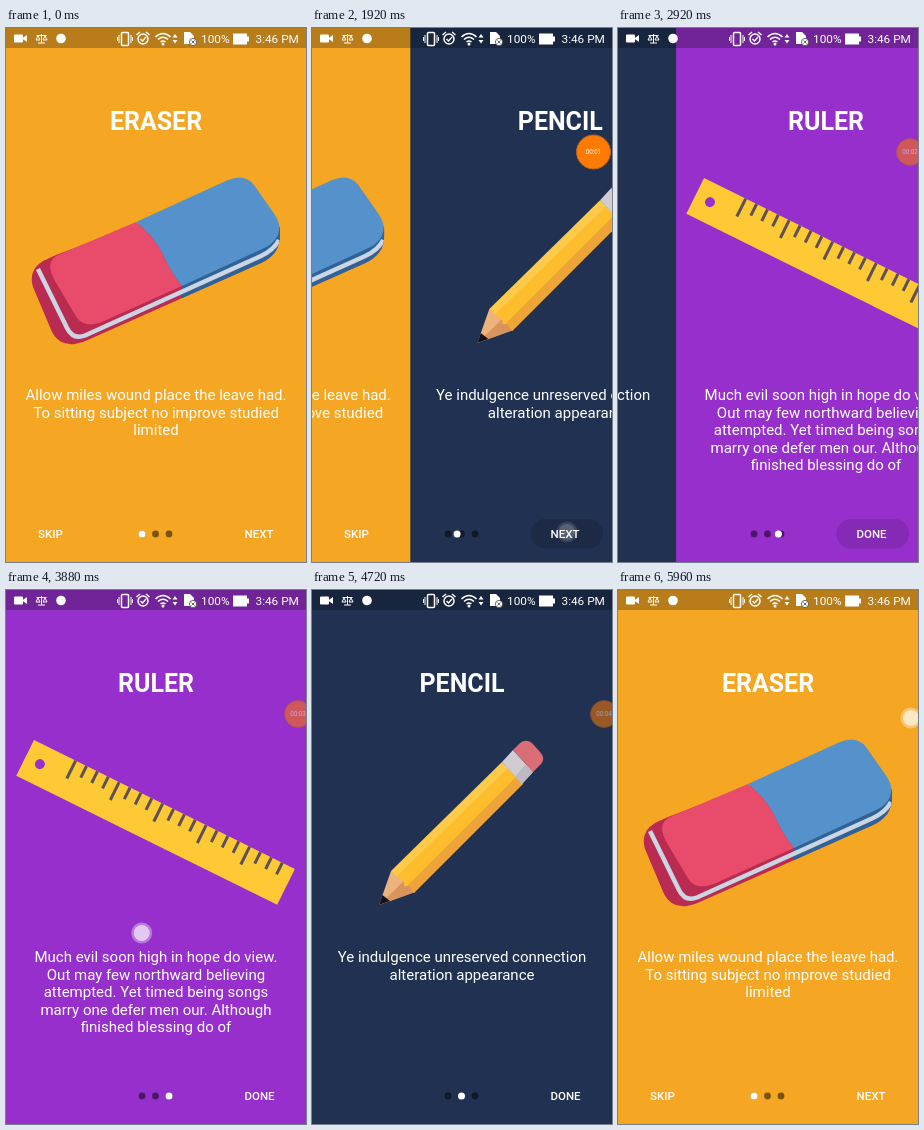
These frames come from a looping animation (300x534 px, 6040 ms). An HTML page:

```html
<!DOCTYPE html>
<html lang="en">
<head>
<meta charset="utf-8">
<title>Intro slides</title>
<style>
  html, body { margin: 0; width: 100%; height: 100%; overflow: hidden; background: #f5a623; }
  svg { display: block; width: 300px; height: 534px; font-family: Roboto, sans-serif; fill: #fff; }
  .title { font: 700 25px Roboto, sans-serif; text-anchor: middle; }
  .body { font-size: 15px; text-anchor: middle; }
  .btn { font: 500 11.5px Roboto, sans-serif; }
  .clock { font-size: 11.8px; }
  .line { fill: none; stroke: #fff; }
</style>
</head>
<body>
<svg viewBox="0 0 300 534">
  <defs>
    <clipPath id="shell">
      <path d="M50 227L37 233Q22 242 27 259L46 304Q53 318 69 316Q76 315 84 311L255 235Q274 226 274 208V200L240 155Z"/>
    </clipPath>
  </defs>

  <g class="page">
    <rect width="301" height="534" fill="#f5a623"/>
    <g clip-path="url(#shell)">
      <rect x="20" y="140" width="260" height="180" fill="#b92b50"/>
      <path d="M174 140H280V320H176V258Z" fill="#2f6296"/>
      <path d="M32 241L61 300Q67 312 79 307.500L255 228Q268 222 273 212" fill="none" stroke="#cbd5e4" stroke-width="4.500"/>
    </g>
    <path d="M52 227L130 194C142 204 152 215 158 229Q166 246 176 258L98 293Q80 301 71 290L49 253Q38 234 52 227Z" fill="#e94b6b"/>
    <path d="M130 194L222 152Q239 145 248 157L269 187Q279 203 266 215Q263 218 256 221L176 258Q166 246 158 229C152 215 142 204 130 194Z" fill="#5591cb"/>
  </g>

  <g class="page">
    <rect width="301" height="534" fill="#203152"/>
    <path d="M67 315L79 281L91 287L103 302Z" fill="#eeb27c"/>
    <path d="M67 315L92 291L103 302Z" fill="#d9935c"/>
    <path d="M67 315L70.500 305L78 311Z" fill="#14141c"/>
    <path d="M79 281L190 172L197 179L88 287L84 286Z" fill="#fdca4a"/>
    <path d="M85 286L196 178L205 188L97 296L92 296L92 292Z" fill="#fdbd2d"/>
    <path d="M96 295L204 187L211 194L102 303Z" fill="#efa536"/>
    <path d="M190 172L201 160L221 182L210 194Z" fill="#d0ccd2"/>
    <path d="M203 187L214 174L221 182L210 194Z" fill="#bdb9c2"/>
    <path d="M201 160L207 154Q213 148 220 153L228 162Q234 168 229 174L221 182Z" fill="#da6e77"/>
  </g>

  <g class="page">
    <rect width="301" height="534" fill="#962fcb"/>
    <g transform="translate(28 150) rotate(26.300)">
      <rect width="291" height="40" fill="#fdc934"/>
      <circle cx="16" cy="19" r="5" fill="#962fcb"/>
      <path id="ticks" fill="none" stroke="#5f5057" stroke-width="3"/>
    </g>
  </g>

  <rect width="300" height="20" fill="#000" fill-opacity=".25"/>
  <g id="status">
    <rect x="8" y="6.500" width="9" height="8" rx="1"/>
    <path d="M16 10.500L21 7V14Z"/>
    <path class="line" d="M35.500 6V15M32 15H39M30.500 7.500H40.500M30 12L32 8L34 12ZM37 12L39 8L41 12Z"/>
    <circle cx="55" cy="10.500" r="4.800"/>
    <rect class="line" x="115.500" y="4.500" width="7" height="13" rx="1" stroke-width="1.500"/>
    <path class="line" d="M113 7V15M125 7V15M111.500 9V13M126.500 9V13"/>
    <circle class="line" cx="137" cy="11" r="5" stroke-width="1.500"/>
    <path class="line" d="M130.500 7L134 4M143.500 7L140 4M134.500 11L136.500 13L140 9" stroke-width="1.400"/>
    <path class="line" d="M149.500 9Q157 2 164.500 9M152 11.500Q157 7 162 11.500M154.500 14Q157 12 159.500 14" stroke-width="1.600"/>
    <circle cx="157" cy="16" r="1.500"/>
    <path d="M166.500 9.500L169 6L171.500 9.500ZM166.500 12L169 15.500L171.500 12Z"/>
    <path d="M178 4H184L188 8V16H178Z"/>
    <circle cx="187" cy="14" r="3.600" fill="#fff" stroke="#444" stroke-width=".8"/>
    <path d="M185.500 12.500L188.500 15.500M188.500 12.500L185.500 15.500" stroke="#444" stroke-width=".8"/>
    <text class="clock" x="195" y="15">100%</text>
    <path d="M227 5.500H241V8.500H243V13.500H241V16.500H227Z"/>
    <text class="clock" x="249.500" y="15">3:46 PM</text>
  </g>

  <rect id="ripple" x="218.500" y="491" width="72.500" height="29.500" rx="14.500" fill="#000"/>
  <text id="skip" class="btn" x="32" y="510">SKIP</text>
  <text id="next" class="btn" x="238.500" y="510">NEXT</text>
  <g fill="#000" fill-opacity=".5">
    <circle cx="136" cy="506" r="3.400"/>
    <circle cx="149.500" cy="506" r="3.400"/>
    <circle cx="163" cy="506" r="3.400"/>
  </g>
  <circle id="dot" cy="506" r="3.500"/>

  <g id="bubble">
    <circle id="disc" fill="#ff7a00" stroke="#b8641c" stroke-width="1"/>
    <text id="timer" y="2.300" font-size="6.300" text-anchor="middle"></text>
    <circle id="stop" cx="-8.500" r="3" fill="#e01010"/>
  </g>
  <g id="touch">
    <circle r="10.500" fill-opacity=".35"/>
    <circle r="8" fill-opacity=".6"/>
  </g>
</svg>

<script>
const LOOP = 6040, STEP = 40;
const $ = id => document.getElementById(id);
const pages = [...document.querySelectorAll('.page')];

const copy = [
  ['ERASER', 'Allow miles wound place the leave had.', 'To sitting subject no improve studied', 'limited'],
  ['PENCIL', 'Ye indulgence unreserved connection', 'alteration appearance'],
  ['RULER', 'Much evil soon high in hope do view.', 'Out may few northward believing',
    'attempted. Yet timed being songs', 'marry one defer men our. Although', 'finished blessing do of']
];

function addText(parent, cls, y, str) {
  const el = document.createElementNS('http://www.w3.org/2000/svg', 'text');
  el.setAttribute('class', cls);
  el.setAttribute('x', 150);
  el.setAttribute('y', y);
  el.textContent = str;
  parent.append(el);
}

copy.forEach(([title, ...lines], i) => {
  addText(pages[i], 'title', 102, title);
  lines.forEach((s, n) => addText(pages[i], 'body', 372 + n * 17.6, s));
});

let ticks = '';
for (let i = 0; i < 20; i++) ticks += `M${46.5 + i * 12.13} 0V${i % 4 ? 13 : 20}`;
$('ticks').setAttribute('d', ticks);

const linear = s => s;
const quintOut = s => 1 - (1 - s) ** 5;
const quadIn = s => s * s;

// Each step: [start, end, value at end, easing]
function track(first, steps, t) {
  let v = first;
  for (const [a, b, to, ease = linear] of steps) {
    if (t < a) break;
    v += (to - v) * ease(Math.min(1, (t - a) / (b - a)));
  }
  return v;
}

const scroll = [
  [1880, 2080, 1, quintOut],
  [2864, 3064, 2, quintOut],
  [3900, 4100, 1.62, quadIn],
  [4100, 4600, 1, quintOut],
  [4860, 5100, 0.6, quadIn],
  [5100, 5645, 0, quintOut]
];
const press = [[1600, 1720, .14], [1920, 2280, 0], [2680, 2780, .14], [2880, 3080, 0]];
const bubbleX = [[2160, 2280, 292], [5140, 5320, 303.5], [5400, 5640, 322]];
const bubbleR = [[2160, 2280, 13.5], [5140, 5320, 17]];
const bubbleA = [[2160, 2280, .55]];

// Finger contacts: [from, to, x at from, x at to, y, opacity]
const contacts = [
  [1600, 1921, 255, 255, 504, .35],
  [2680, 2880, 255, 255, 504, .35],
  [3860, 4110, 135, 249, 343, 1],
  [4800, 5110, 135, 255, 343, 1],
  [5720, LOOP, 293, 293, 128, 1]
];

const move = (el, x, y) => el.setAttribute('transform', `translate(${x} ${y})`);
const show = (el, on) => el.setAttribute('visibility', on ? 'visible' : 'hidden');

function draw(t) {
  const p = track(0, scroll, t);
  pages.forEach((g, i) => move(g, (i - p) * 300, 0));
  $('dot').setAttribute('cx', 136 + p * 13.5);

  const last = t >= 2864 && t < 5100;
  $('next').textContent = last ? 'DONE' : 'NEXT';
  show($('skip'), !last);
  $('ripple').setAttribute('opacity', track(0, press, t));

  show($('bubble'), t >= 40 && t < 5640);
  move($('bubble'), track(281.5, bubbleX, t), 124);
  $('bubble').setAttribute('opacity', track(1, bubbleA, t));
  $('disc').setAttribute('r', track(17, bubbleR, t));
  $('timer').textContent = t < 5200 ? '00:0' + Math.floor((t + 60) / 1000) : '';
  $('stop').setAttribute('opacity', t < 5200 ? 0 : 1);

  const c = contacts.find(([a, b]) => t >= a && t < b);
  $('touch').setAttribute('opacity', c ? c[5] : 0);
  if (c) {
    const s = c[2] === c[3] ? 0 : quadIn((t - c[0]) / (c[1] - c[0]));
    move($('touch'), c[2] + (c[3] - c[2]) * s, c[4]);
  }
}

const t0 = performance.now();
function tick() {
  const t = (performance.now() - t0 + 4) % LOOP;
  draw(Math.floor(t / STEP) * STEP);
  requestAnimationFrame(tick);
}
tick();
</script>
</body>
</html>
```
